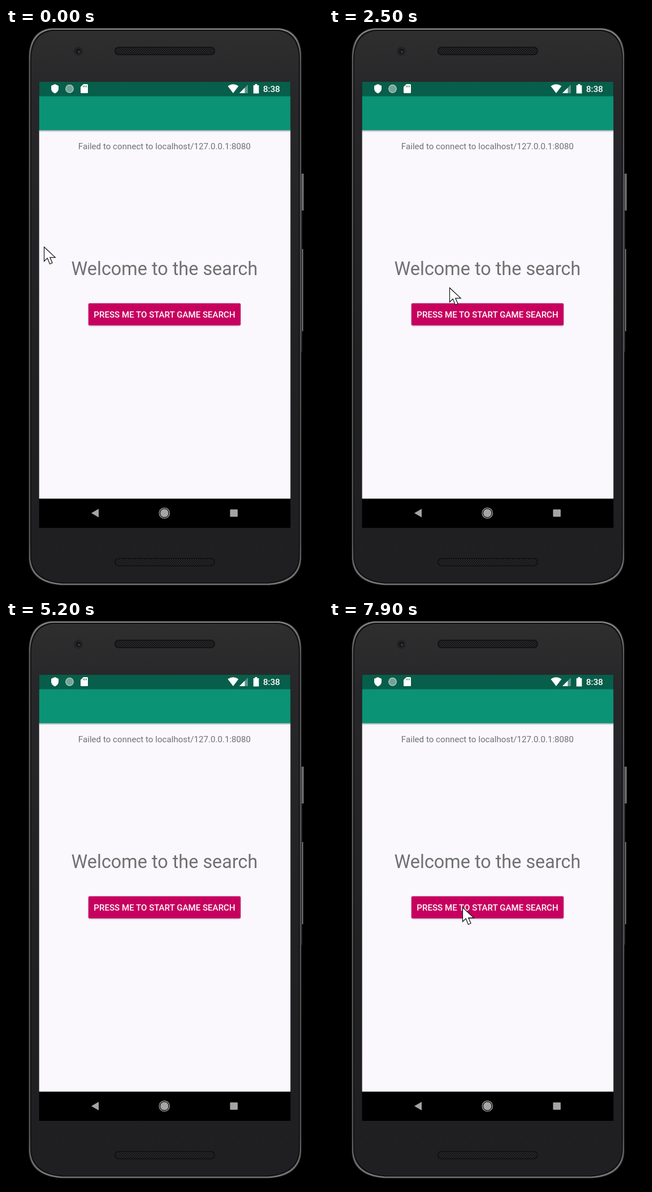
An HTML page for the animation above (8 s loop, 561 px wide and 997 px high).

```html
<!DOCTYPE html>
<html lang="en">
<head>
<meta charset="utf-8">
<title>Game search</title>
<style>
  html, body { margin: 0; width: 100%; height: 100%; overflow: hidden; background: #000; }
  svg { display: block; width: 561px; height: 997px; font-family: Roboto, sans-serif; }
</style>
</head>
<body>
<svg viewBox="0 0 561 997">
  <defs>
    <linearGradient id="shell" x2="0" y2="1">
      <stop offset="0" stop-color="#2f2e2f"/>
      <stop offset=".12" stop-color="#272628"/>
      <stop offset=".6" stop-color="#212022"/>
      <stop offset="1" stop-color="#1f1e20"/>
    </linearGradient>
    <linearGradient id="rim" x2="0" y2="1">
      <stop offset="0" stop-color="#8a8a8a"/>
      <stop offset=".06" stop-color="#5c5c5c"/>
      <stop offset=".92" stop-color="#555"/>
      <stop offset="1" stop-color="#808080"/>
    </linearGradient>
    <linearGradient id="fade" x2="0" y2="1">
      <stop offset="0" stop-color="#000" stop-opacity=".3"/>
      <stop offset="1" stop-color="#000" stop-opacity="0"/>
    </linearGradient>
    <pattern id="mesh" width="4" height="4" patternUnits="userSpaceOnUse">
      <circle cx="1" cy="1" r=".9" fill="#343334"/>
      <circle cx="3" cy="3" r=".9" fill="#343334"/>
    </pattern>
    <filter id="blur" x="-10%" y="-40%" width="120%" height="180%"><feGaussianBlur stdDeviation="1.5"/></filter>
    <path id="body" d="M40 52C40 22 53 2 80 0H484C509 2 523 20 523 50V934C523 963 505 981 466 983.500H97C59 981 40 963 40 934Z"/>
    <g id="grille">
      <rect width="178" height="15" rx="7" fill="#131214"/>
      <rect x="2" y="2" width="174" height="11" rx="5.5" fill="url(#mesh)"/>
    </g>
  </defs>

  <!-- phone shell -->
  <path d="M521 257H527V322H521ZM521 390H526V535H521Z" fill="#686868"/>
  <path d="M521 322H524V571H521Z" fill="#3c3c3c"/>
  <use href="#body" fill="#262626"/>
  <use href="#body" fill="url(#rim)" transform="translate(281.5 491.7) scale(.996 .998) translate(-281.5 -491.7)"/>
  <use href="#body" fill="#121113" transform="translate(281.5 491.7) scale(.988 .994) translate(-281.5 -491.7)"/>
  <use href="#body" fill="url(#shell)" transform="translate(281.5 491.7) scale(.98 .99) translate(-281.5 -491.7)"/>
  <circle cx="128" cy="41" r="8" fill="#232224"/>
  <circle cx="128" cy="41" r="4.5" fill="#161517"/>
  <circle cx="129" cy="42" r="1.8" fill="#454345"/>
  <use href="#grille" x="192" y="33"/>
  <use href="#grille" x="192" y="935"/>

  <!-- screen -->
  <path d="M58.600 95H503.400V882H58.600Z" fill="#000"/>
  <path d="M58.600 180H503.400V830.400H58.600Z" fill="#faf8fd"/>
  <path d="M58.600 95H503.400V121H58.600Z" fill="#075e4a"/>
  <path d="M58.600 120.500H503.400V180.400H58.600Z" fill="#0b9376"/>
  <path d="M58.600 180.400H503.400V184H58.600Z" fill="url(#fade)"/>

  <!-- status bar -->
  <g fill="#fff">
    <path d="M86.5 99L93 102V107C93 111 90 114 86.5 115.5C83 114 80 111 80 107V102Z"/>
    <circle cx="112.5" cy="107.3" r="6.7" fill="#71a497" stroke="#aac9c0" stroke-width="1.5"/>
    <path d="M137 99H143.5Q145 99 145 100.5V113.5Q145 115 143.5 115H133.5Q132 115 132 113.5V104Z"/>
    <path d="M137 101.5V104.5M139.7 101.5V104.5M142.4 101.5V104.5" stroke="#075e4a"/>
    <path d="M392.5 102.5Q402 96 411.5 102.5L402 115Z"/>
    <path d="M428 100V115H413Z" opacity=".35"/>
    <path d="M422.5 105.5V115H413Z"/>
    <path d="M440.5 99H444.5V101H447.5V115.5H437.8V101H440.5Z"/>
    <text x="470" y="113" font-size="15.3" font-weight="500" text-anchor="middle">8:38</text>
  </g>

  <!-- page -->
  <g text-anchor="middle" fill="#707072">
    <text x="280.5" y="214" font-size="15.15">Failed to connect to localhost/127.0.0.1:8080</text>
    <text x="280.5" y="436" font-size="32.4">Welcome to the search</text>
    <rect id="shadow" x="146.500" width="268" height="38.500" rx="2" fill="#000" filter="url(#blur)"/>
    <rect x="145.800" y="485.700" width="269.400" height="39" rx="2" fill="#c7005f"/>
    <text x="280.5" y="511" font-size="15.1" font-weight="500" fill="#fff">PRESS ME TO START GAME SEARCH</text>
  </g>

  <!-- navigation -->
  <g fill="#a5a5a5">
    <path d="M151 856L164 848.5V863.5Z"/>
    <circle cx="280.3" cy="856" r="7.3"/>
    <circle cx="280.3" cy="856" r="9.2" fill="none" stroke="#a5a5a5" stroke-width="1.3"/>
    <rect x="396.5" y="849.5" width="13.5" height="13" rx="1"/>
  </g>

  <path id="cursor" d="M.5 .5V25.5L6.3 20L10.5 30.5L15 28.5L10.8 18.8H20.2Z" fill="#fff" stroke="#111" stroke-width="1.2"/>
</svg>
<script>
  const LOOP = 8000, STEP = 100;
  const cursor = document.getElementById('cursor');
  const shadow = document.getElementById('shadow');

  // Eased progress from 0 to 1 between two times
  function ease(t, from, to) {
    const p = Math.min(1, Math.max(0, (t - from) / (to - from)));
    return p * p * (3 - 2 * p);
  }

  // Tip of the pointer, or null while it is hidden
  function pointerAt(t) {
    if (t < 400) return [67, 386];
    if (t >= 2200 && t < 2900) return [213, 458];
    if (t < 6000) return null;
    const p = ease(t, 6700, 7400);
    return [229 + 7 * p, 510 - 5 * p];
  }

  function draw(now) {
    const t = Math.floor(now % LOOP / STEP) * STEP;
    const tip = pointerAt(t);
    cursor.style.display = tip ? '' : 'none';
    if (tip) cursor.setAttribute('transform', `translate(${tip})`);

    const press = ease(t, 6200, 6400) - ease(t, 6500, 6800);
    shadow.setAttribute('y', 487 + 2 * press);
    shadow.setAttribute('opacity', .36 + .06 * press);
    requestAnimationFrame(draw);
  }
  draw(0);
</script>
</body>
</html>
```
